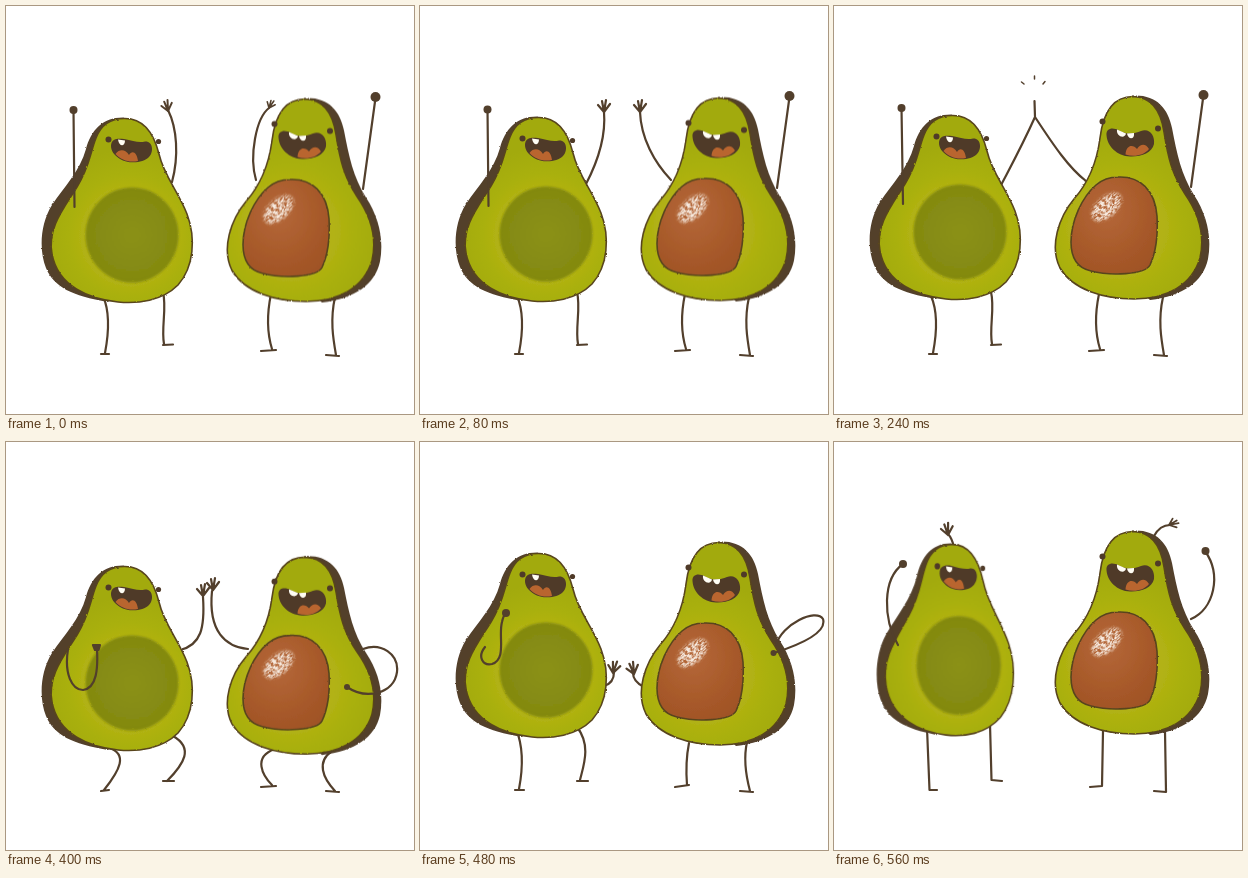
These frames come from a looping animation (408 px wide and 408 px high, 0.64 s). An HTML page without scripts:

```html
<!DOCTYPE html>
<html lang="en">
<head>
<meta charset="utf-8">
<title>Avocado high five</title>
<style>
  html, body { margin: 0; width: 100%; height: 100%; overflow: hidden; background: #fff; }
  svg { display: block; width: 100vw; height: 100vh; }

  .limb { fill: none; stroke: #523f2c; stroke-width: 2.2; stroke-linecap: round; stroke-linejoin: round; }
  .limb circle { fill: #523f2c; stroke: none; }
  .skin { fill: #523f2c; }
  .line { stroke: #58451f; stroke-width: 1.6; }
  .ink { fill: #4f3a28; }
  .tongue { fill: #b9652f; }
  .tooth { fill: #fffdf4; }

  /* eight poses of 80 ms, each shown in turn */
  .pose { visibility: hidden; animation: show 640ms step-end infinite; animation-delay: calc(var(--i) * 80ms - 640ms); }
  @keyframes show { 0% { visibility: visible; } 12.5%, 100% { visibility: hidden; } }

  #left { transform-origin: 111.5px 297px; animation: left 640ms step-end infinite; }
  @keyframes left {
    0%    { transform: none; }
    12.5% { transform: translateY(-1px); }
    25%   { transform: translateY(-2px); }
    37.5% { transform: translateY(-3px); }
    50%   { transform: translateY(5.5px); }
    62.5% { transform: translateY(12px); }
    75%   { transform: translateY(-1px); }
    87.5% { transform: translateY(-3px) scale(.908, 1.038); }
  }
  #right { transform-origin: 299px 293px; animation: right 640ms step-end infinite; }
  @keyframes right {
    0%    { transform: translateY(2.5px); }
    12.5% { transform: translateY(1.5px); }
    25%   { transform: translateY(.5px); }
    37.5% { transform: none; }
    50%   { transform: translateY(10px); }
    62.5% { transform: translateY(19px) scaleY(.972); }
    75%   { transform: translateY(10px); }
    87.5% { transform: translateY(-1px); }
  }
</style>
</head>
<body>
<svg viewBox="0 0 408 408">
  <defs>
    <radialGradient id="fleshL" gradientUnits="userSpaceOnUse" cx="124" cy="230" r="88">
      <stop offset=".52" stop-color="#b2b214"/><stop offset=".7" stop-color="#a9b00b"/><stop offset="1" stop-color="#a2aa08"/>
    </radialGradient>
    <radialGradient id="fleshR" gradientUnits="userSpaceOnUse" cx="284" cy="222" r="94">
      <stop offset=".48" stop-color="#b2b214"/><stop offset=".7" stop-color="#a9b00b"/><stop offset="1" stop-color="#a2aa08"/>
    </radialGradient>
    <radialGradient id="hollow">
      <stop offset="0" stop-color="#8b9114"/><stop offset="1" stop-color="#838911"/>
    </radialGradient>
    <radialGradient id="seed" cx=".42" cy=".35" r=".75">
      <stop offset="0" stop-color="#b5683a"/><stop offset=".55" stop-color="#a95b2b"/><stop offset="1" stop-color="#9f5225"/>
    </radialGradient>
    <filter id="soft"><feGaussianBlur stdDeviation=".9"/></filter>
    <filter id="rough" x="-5%" y="-5%" width="110%" height="110%">
      <feTurbulence type="fractalNoise" baseFrequency=".35" numOctaves="2" seed="4"/>
      <feDisplacementMap in="SourceGraphic" scale="2" xChannelSelector="R" yChannelSelector="G"/>
    </filter>
    <filter id="chalk" x="-20%" y="-20%" width="140%" height="140%">
      <feTurbulence type="fractalNoise" baseFrequency=".3 .7" numOctaves="2" seed="9"/>
      <feComponentTransfer result="grain"><feFuncA type="linear" slope="5" intercept="-1.9"/></feComponentTransfer>
      <feGaussianBlur in="SourceGraphic" stdDeviation="1.8"/>
      <feComposite in2="grain" operator="in"/>
    </filter>
    <path id="hand" d="M0 0L-6-7M0 0L-2-11M0 0L2-12M0 0L6-8"/>

    <g id="legsL"><path d="M97 290C104 306 103 326 99 347M95 348L103 348"/><path d="M157 286C161 302 155 322 158 338M157 339L167 338.500"/></g>
    <g id="legsR"><path d="M265 288C260 312 262 330 266 343M255 345L270 344"/><path d="M329 291C324 314 327 332 330 349M320 349L333 350"/></g>
  </defs>

  <!-- limbs behind the bodies -->
  <g class="limb">
    <g class="pose" style="--i:0">
      <use href="#legsL"/><use href="#legsR"/>
      <path d="M166 176C173 150 171 122 162 104M250 174C243 150 250 112 263 102"/>
      <use href="#hand" transform="translate(162 105) rotate(-12) scale(.9)"/>
      <use href="#hand" transform="translate(263 102) rotate(25) scale(.7)"/>
    </g>
    <g class="pose" style="--i:1">
      <use href="#legsL"/><use href="#legsR"/>
      <path d="M166 178C178 155 186 130 184 106M251 174C234 156 221 132 220 106"/>
      <use href="#hand" transform="translate(184 106)"/>
      <use href="#hand" transform="translate(220 106)"/>
    </g>
    <g class="pose" style="--i:2">
      <use href="#legsL"/><use href="#legsR"/>
      <path d="M166 181C178 160 190 136 200 111V95M252 175C235 160 217 138 201 111"/>
      <path d="M193 84L191 80M200.500 82V77M207 84L209 80"/>
    </g>
    <g class="pose" style="--i:3">
      <use href="#legsL"/><use href="#legsR"/>
      <path d="M166 181C178 158 188 140 201 111L200.500 95M252 175C235 162 220 140 201 111"/>
      <path stroke-width="1.500" d="M190 78L187.500 76M200.500 73V70M209 78L211 75.500"/>
    </g>
    <g class="pose" style="--i:4">
      <path d="M99 298C108 310 108 328 97 347M95 348L103 348M160 292C169 304 166 322 160 338M157 339L167 339"/>
      <path d="M267 299C255 314 258 330 267 343M255 345L270 344M327 300C316 315 318 334 331 349M320 349L333 350"/>
      <path d="M165 184C184 165 203 138 202 112M253 178C230 160 206 130 202 110"/>
      <path style="stroke-width:4" d="M201.500 109L201 99"/>
      <path style="stroke-width:1.500" d="M184 74H185M200.500 66.500H201M214 73L215 74"/>
    </g>
    <g class="pose" style="--i:5">
      <path d="M103 306C122 312 114 328 98 348M95 349L103 348M167 294C188 306 178 322 161 339M157 339L168 339"/>
      <path d="M269 307C246 315 257 334 266 343M255 345L270 344M326 309C310 320 317 336 329 349M320 349L333 350"/>
      <path d="M174 208C195 203 199 186 197 155M242 207C220 205 202 190 206 149"/>
      <use href="#hand" transform="translate(197 154)"/>
      <use href="#hand" transform="translate(207 148)"/>
    </g>
    <g class="pose" style="--i:6">
      <path d="M96 287C104 306 103 326 99 347M95 348L104 348M157 285C171 303 164 322 160 338M157 339L168 339"/>
      <path d="M269 301C266 316 266 330 267 343M255 345L269 343M327 300C323 318 326 334 330 349M320 349L333 350"/>
      <path d="M184 244C191 242 194 238 194 230M224 245C216 241 213 236 213 231"/>
      <use href="#hand" transform="translate(193 231) rotate(10)"/>
      <use href="#hand" transform="translate(214 232) rotate(-14)"/>
    </g>
    <g class="pose" style="--i:7">
      <path d="M93 286L95.500 348L103 348M156 282L157.500 338L168 339"/>
      <path d="M269 289L268 344L256 345M331 289L332 350L320 349"/>
      <path d="M120 105C118 97 117 95 114 92M320 94C325 85 331 83 336 83"/>
      <use href="#hand" transform="translate(114 93) rotate(-9)"/>
      <use href="#hand" transform="translate(335 83) rotate(70) scale(.8)"/>
    </g>
  </g>

  <!-- avocado with the hollow -->
  <g id="left">
    <g filter="url(#rough)">
      <path class="skin" d="M118 111.500C97 111 85 124 80 143C74 165 58 181 46 199C34 218 33 245 40 262C48 281 66 290 102 296L118 280Z"/>
      <path class="line" fill="url(#fleshL)" d="M118 112.500C138 112 148 128 153 148C158 170 172 185 181 208C190 232 188 261 172 279C156 295 132 298 112 296C84 293 52 281 46 248C41 222 58 202 71 181C84 160 84 147 90 132C95 119 105 112.500 118 112.500Z"/>
      <ellipse cx="126" cy="229" rx="46.500" ry="47.500" fill="url(#hollow)" filter="url(#soft)"/>
    </g>
    <circle class="ink" cx="102.500" cy="133.500" r="3"/>
    <circle class="ink" cx="152.500" cy="135.500" r="2.600"/>
    <path class="ink" d="M105 140C105 133 111 132 118 133C127 135 133 137 139 135.500C147 135 148 146 143 151C137 157.500 122 158 114 153C108 149 105 145 105 140Z"/>
    <path class="tongue" d="M109.500 148C114 142 120 144 123 149C126 144 131 146 132 155C123 157 115 154 109.500 148Z"/>
    <path class="tooth" d="M112 133.500L119 134.500C119 141 113 141 112 133.500Z"/>
  </g>

  <!-- avocado with the seed -->
  <g id="right">
    <g filter="url(#rough)">
      <path class="skin" d="M298 89.500C322 88 334 102 338 122C343 148 347 168 360 189C373 209 378 231 374 253C369 276 349 290 316 294L298 278Z"/>
      <path class="line" fill="url(#fleshR)" d="M299 90.500C318 91 327 106 330 126C334 152 338 168 351 188C365 208 371 230 366 252C358 279 333 293 300 293C270 293 239 284 226 262C215 240 225 211 240 193C255 176 263 155 266 132C269 107 279 90.500 299 90.500Z"/>
      <path class="line" fill="url(#seed)" d="M284 171C306 170 321 184 323 210C324 228 322 246 316 259C311 269 276 270 257 265C243 262 237 252 237 236C237 215 248 191 262 179C269 173 277 171 284 171Z"/>
      <ellipse cx="272.500" cy="201" rx="18" ry="10" fill="#f7eadf" transform="rotate(-42 272.500 201)" filter="url(#chalk)"/>
    </g>
    <circle class="ink" cx="268.500" cy="115.500" r="3"/>
    <circle class="ink" cx="324" cy="122.500" r="3"/>
    <path class="ink" d="M272.500 129C272 122 279 121 285 124.500C293 129 300 128 307 125C316 122 321 130 320 138C318 147 307 151 296 150.500C283 150 273 140 272.500 129Z"/>
    <path class="tongue" d="M291.500 148.500C292 139 299 138 303 143C307 137 312 138 315 143C309 150 300 151 291.500 148.500Z"/>
    <path class="tooth" d="M283 123.500L292 127.500C291 133 282 131 283 123.500Z"/>
    <path class="tooth" d="M293 127.500L300 127C301 134 294 134 293 127.500Z"/>
  </g>

  <!-- arms in front of the bodies -->
  <g class="limb">
    <g class="pose" style="--i:0">
      <path d="M68.500 201L67.500 104M357 183L369.500 92"/>
      <circle cx="67.500" cy="104" r="4"/><circle cx="369.500" cy="91" r="5"/>
    </g>
    <g class="pose" style="--i:1">
      <path d="M68.500 200L67.500 103M357 182L369.500 91"/>
      <circle cx="67.500" cy="103.500" r="4"/><circle cx="369.500" cy="90" r="5"/>
    </g>
    <g class="pose" style="--i:2">
      <path d="M69 199L67.500 102M357 181L369.500 90"/>
      <circle cx="67.500" cy="103" r="4"/><circle cx="369.500" cy="89.500" r="5"/>
    </g>
    <g class="pose" style="--i:3">
      <path d="M69 198L67.500 102M357 181L369.500 89"/>
      <circle cx="67.500" cy="102" r="4"/><circle cx="369.500" cy="89" r="5"/>
    </g>
    <g class="pose" style="--i:4">
      <path d="M65 209C65 221 69 225 76 224C90 220 92 190 90 163M362 198C382 200 397 184 396 146"/>
      <circle cx="89.500" cy="162.500" r="4"/><circle cx="396" cy="146" r="4"/>
    </g>
    <g class="pose" style="--i:5">
      <path d="M62 207C58 232 66 248 77 248C91 246 92 226 91 207M357 207C375 200 393 212 391 230C388 252 360 258 341 245"/>
      <path fill="#523f2c" d="M87 203H94L92.500 208H89Z"/><circle cx="341" cy="245" r="3"/>
    </g>
    <g class="pose" style="--i:6">
      <path d="M65 205C57 215 63 224 72 222C87 217 78 194 82 180C83 175 84 173 86 171M356 203C362 182 396 166 403 177C407 190 382 202 354 211"/>
      <circle cx="86" cy="171" r="4"/><circle cx="353.500" cy="211" r="3"/>
    </g>
    <g class="pose" style="--i:7">
      <path d="M64 203C49 177 48 137 69 122M357 177C380 167 388 133 371 109"/>
      <circle cx="69" cy="122" r="4"/><circle cx="371.500" cy="109" r="4"/>
    </g>
  </g>
</svg>
</body>
</html>
```
